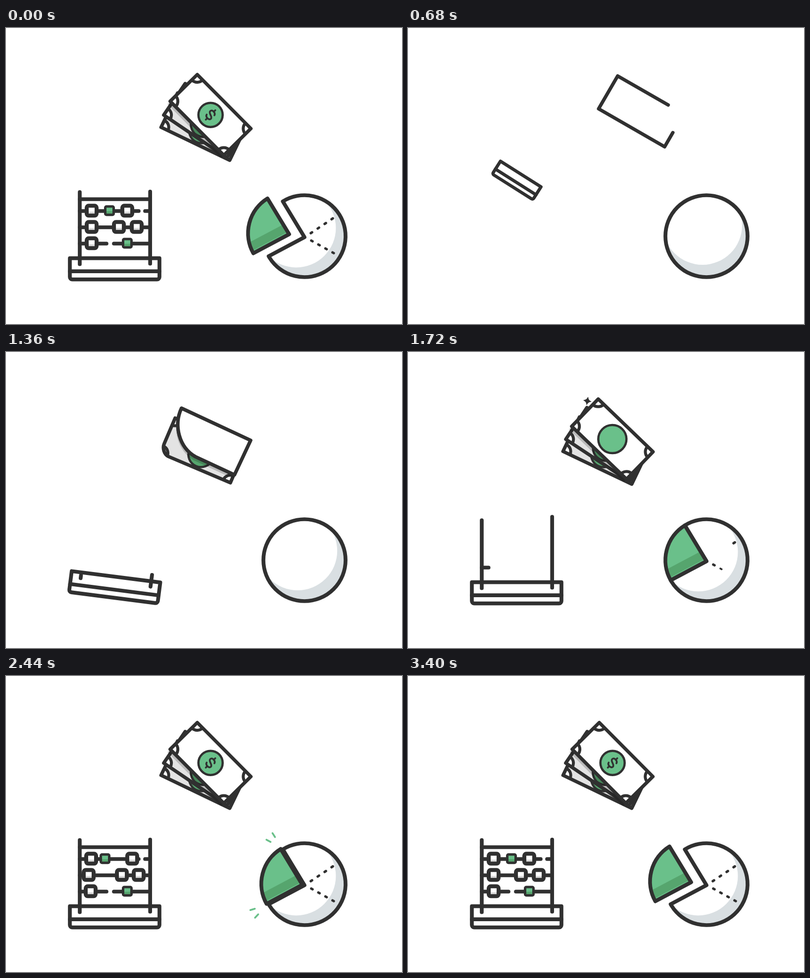
Recreate the animation shown at these times as an HTML page with a canvas. Size 800x600 px, loop 4.84 s.

```html
<!DOCTYPE html>
<html lang="en">
<head>
<meta charset="utf-8">
<title>Finance icons</title>
<style>
  html, body { margin: 0; width: 100%; height: 100%; overflow: hidden; background: #fff; }
  canvas { display: block; width: 800px; height: 600px; }
</style>
</head>
<body>
<canvas id="stage" width="800" height="600"></canvas>
<script>
const c = document.getElementById('stage').getContext('2d');
const LOOP = 4840, STEP = 40, TAU = Math.PI * 2;
const INK = '#303030', GREEN = '#6ac08a', DEEP = '#56a56e', PAPER = '#e3e3e3', SHADE = '#d9dfe2';
const THICK = 7.7;

const rad = d => d * Math.PI / 180;
const mix = (a, b, p) => a + (b - a) * p;
const span = (t, start, dur) => Math.min(1, Math.max(0, (t - start) / dur));
const easeOut = p => 1 - (1 - p) ** 3;
const easeInOut = p => p < .5 ? 2 * p * p : 1 - 2 * (1 - p) ** 2;
const overshoot = p => p && 1 - 3.3 * (1 - p) ** 3 + 2.3 * (1 - p) ** 2;

function paint(fill, width, color = INK) {
  if (fill) { c.fillStyle = fill; c.fill(); }
  if (width) { c.strokeStyle = color; c.lineWidth = width; c.stroke(); }
}
function line(x1, y1, x2, y2, w = THICK, color = INK) {
  c.beginPath();
  c.moveTo(x1, y1);
  c.lineTo(x2, y2);
  paint(null, w, color);
}
function disc(x, y, r, fill, w) {
  if (r <= 0) return;
  c.beginPath();
  c.arc(x, y, r, 0, TAU);
  paint(fill, w);
}
function group(draw) {
  c.save();
  draw();
  c.restore();
}

/* ---------- bank notes: 0 back, 1 middle, 2 front ---------- */
const BX = 77, BY = 38.5;

// Notes in the fan lie about their lower right corners.
function restPose(i) {
  const deg = 25.7 + 7.2 * i + 1.3 * i * i, a = rad(deg);
  return [
    452 - 6 * i - BX * Math.cos(a) + BY * Math.sin(a),
    268 - 5 * i - BX * Math.sin(a) - BY * Math.cos(a),
    deg
  ];
}
// Spin in the air, land as a pile, then fan out.
function place(t, i) {
  const s = Math.min(t, 1360) - 680;
  const air = [471 + s / 64, 169 + s / 320, -150 + .2317 * s + 3.78e-5 * s * s];
  const land = easeInOut(span(t, 1040, 320)), fan = easeOut(span(t, 1360, 600));
  const pile = i ? [408, 181.5, air[2]] : [397.5, 199.5, air[2] - 2];
  const rest = restPose(i);
  const [x, y, deg] = air.map((v, k) => mix(mix(v, pile[k], land), rest[k], fan));
  c.translate(x, y);
  c.rotate(rad(deg));
}
// The lower left corner curls up by the amount b.
function sheet(b) {
  c.beginPath();
  c.moveTo(BX, -BY);
  c.lineTo(BX, BY);
  c.lineTo(67 * b - BX, BY);
  c.bezierCurveTo(30 * b - BX, BY - 3 * b, -BX, BY - 38 * b, -BX, BY - 77 * b);
  c.lineTo(-BX, -BY);
  c.closePath();
}
function note(fill, bend, cornerR, coinR, coinY, coinFill) {
  sheet(bend);
  paint(fill);
  group(() => {
    c.clip();
    for (const sx of [-1, 1]) for (const sy of [-1, 1]) disc(sx * BX, sy * BY, cornerR, '#fff', 6);
  });
  disc(0, coinY, coinR, coinFill, 4.5);
  sheet(bend);
  paint(null, 7);
}
function outline(t) {
  const per = 4 * (BX + BY), len = per * easeInOut(span(t, 440, 340));
  if (!len) return;
  if (len < per) {
    c.setLineDash([len, per - len]);
    c.lineDashOffset = len * .49;
  }
  sheet(0);
  paint(null, 7);
}
function dollar(s) {
  if (!s) return;
  c.scale(s, s);
  c.beginPath();
  c.moveTo(6, -5);
  c.bezierCurveTo(5, -10, -6, -11, -6, -5);
  c.bezierCurveTo(-6, 1, 6, -1, 6, 5);
  c.bezierCurveTo(6, 11, -5, 10, -6, 5);
  paint(null, 3.6);
  for (const side of [-1, 1]) line(0, 13.5 * side, 0, 9.5 * side, 3.6);
}
function star(t) {
  const p = span(t, 1640, 700), r = 12 * Math.sin(Math.PI * p ** .7);
  if (r < .1) return;
  c.translate(366 - 12 * easeOut(p), 116 - 55 * easeOut(p));
  c.rotate(rad(10));
  c.beginPath();
  c.moveTo(0, -r);
  for (let i = 1; i <= 4; i++) {
    const a = i * TAU / 4, m = a - TAU / 8;
    c.quadraticCurveTo(Math.sin(m) * r * .28, -Math.cos(m) * r * .28, Math.sin(a) * r, -Math.cos(a) * r);
  }
  paint(INK, 1);
}
function money(t) {
  if (t < 800) {
    group(() => { place(t, 2); outline(t); });
    return;
  }
  const bend = Math.sin(Math.PI * span(t, 1140, 440));
  if (t > 1160) {
    for (const i of [0, 1]) group(() => {
      place(t, i);
      note(PAPER, bend * (i ? 1 : .27), 15.5, 25.5, 9, DEEP);
    });
    group(() => {
      place(t, 2);
      c.translate(0, 8);
      sheet(bend);
      paint('rgba(0,0,0,.18)');
    });
  }
  group(() => {
    place(t, 2);
    note('#fff', bend, 15.5 * easeOut(span(t, 1480, 180)), 24.5 * overshoot(span(t, 1520, 400)), 0, GREEN);
    dollar(easeOut(span(t, 1800, 200)));
  });
  group(() => star(t));
}

/* ---------- abacus ---------- */
// Beads are [slot, nudge]: the place on the rod and the earlier distance from it.
const ROWS = [
  { y: 371, gap: [268, 281], green: 1, beads: [[0, -1], [1, -9], [2, 10]] },
  { y: 404, gap: [291, 291], beads: [[0, -6], [1.53, 6], [2.53, 4]] },
  { y: 437, gap: [203, 218], green: 1, beads: [[0, -2], [2, 0]] }
];
function bead(x, y, green, s) {
  if (!s) return;
  c.translate(x, y);
  c.scale(s, s);
  const h = green ? 8.5 : 10;
  c.beginPath();
  c.roundRect(-h, -h, 2 * h, 2 * h, green ? 2.5 : 4);
  paint(green ? GREEN : '#fff');
  c.fillStyle = green ? DEEP : '#dadada';
  c.fillRect(-h, green ? 1 : 2, 2 * h, h - 2);
  paint(null, green ? 5 : 8);
}
function rod(t, y, start, [from, to]) {
  const p = easeOut(span(t, start, 300)), end = 149 + 142 * p;
  if (!p) return;
  line(149, y, Math.min(end, from), y);
  if (end > to) line(to, y, end, y);
}
function base(t) {
  const grow = easeOut(span(t, 584, 416));
  if (!grow) return;
  const lean = 59.5 * (grow - easeOut(span(t, 1000, 716))), a = rad(lean);
  const fall = 309 + .00096 * Math.max(0, t - 740) ** 2;
  const ground = 509.7 - 90.5 * Math.sin(a) - 21.5 * Math.cos(a);
  const sx = grow * (1 - lean / 2000), sy = Math.sqrt(grow) * (1 - lean / 1000);
  const w = 90.5 * sx, h = 21.5 * sy, ink = THICK * Math.sqrt(sy);
  c.translate(219.5, Math.min(fall, ground));
  c.rotate(a);
  c.beginPath();
  c.roundRect(-w, -h, 2 * w, 2 * h, [0, 0, 5 * sy, 5 * sy]);
  paint(null, ink);
  line(-w, 5 * sy, w, 5 * sy, ink);
  const left = 146 * easeOut(span(t, 1352, 600)), right = 146 * easeOut(span(t, 1330, 520));
  if (left) line(-70.5, -9.5, -70.5, -9.5 - left);
  if (right) line(71.7, -10.5, 71.7, -10.5 - right);
}
function abacus(t) {
  group(() => base(t));
  const offset = 1 - easeInOut(span(t, 2400, 1000));
  rod(t, 347, 1890, [291, 291]);
  ROWS.forEach(({ y, gap, green, beads }, row) => {
    rod(t, y, 1830 - 60 * row, gap);
    beads.forEach(([slot, nudge], i) => group(() =>
      bead(173 + 36 * slot + nudge * offset, y - .7, i === green,
        easeOut(span(t, 2000 + 20 * (row * 3 + i), 200)))));
  });
}

/* ---------- pie ---------- */
const PX = 603, PY = 422, R = 83, TIP_Y = 424;
const A1 = rad(150.7), A2 = rad(238.2);

function sector(from, to) {
  c.beginPath();
  c.moveTo(PX, TIP_Y);
  c.arc(PX, PY, R, from, to);
  c.closePath();
}
function wedge() {
  sector(A1, A2);
  paint(GREEN);
  group(() => {
    c.clip();
    c.translate(PX, TIP_Y);
    c.rotate(rad(-28));
    c.fillStyle = DEEP;
    c.fillRect(-100, -23, 110, 17.5);
  });
  sector(A1, A2);
  paint(null, THICK);
}
// The shade swings down and back while the disc is alone.
function crescent(t) {
  const a = rad(45 + 48.5 * Math.exp(-(((t - 942) / 321) ** 2)));
  c.globalAlpha = span(t, 320, 240);
  c.beginPath();
  c.arc(PX, PY, R, 0, TAU);
  c.clip();
  c.beginPath();
  c.rect(PX - 90, PY - 90, 180, 180);
  c.arc(PX - 23.5 * Math.cos(a), PY - 23.5 * Math.sin(a), 80, 0, TAU);
  c.fillStyle = SHADE;
  c.fill('evenodd');
}
function dots(t) {
  const dot = (x, y, slope, s) => s && line(x - 1.3, y - 1.3 * slope, x + 1.3, y + 1.3 * slope, 5 * s);
  for (let i = 0; i < 4; i++) {
    dot(617 + 14 * i, 415 - 9.4 * i, -.67, span(t, 1850 - 60 * i, 40));
    dot(618 + 14.3 * i, 431.6 + 8 * i, .56, span(t, 1630 + 60 * i, 40));
  }
}
function rays(t) {
  const p = span(t, 2320, 320);
  const inner = 12 + 36 * p, len = 9.5 * Math.sin(Math.PI * Math.min(1, p * 1.25));
  if (len < .1) return;
  for (const [corner, mid] of [[A1, 148.5], [A2, 222.5]]) for (const turn of [-15, 15]) {
    const a = rad(mid + turn), dx = Math.cos(a), dy = Math.sin(a);
    const x = PX + 87 * Math.cos(corner), y = PY + 87 * Math.sin(corner);
    line(x + dx * inner, y + dy * inner, x + dx * (inner + len), y + dy * (inner + len), 3.6, GREEN);
  }
}
function pie(t) {
  const sweep = easeInOut(span(t, 60, 440));
  if (!sweep) return;
  group(() => crescent(t));
  const grow = easeOut(span(t, 1400, 200)), out = easeOut(span(t, 2400, 840));
  if (grow < 1) {
    c.beginPath();
    c.arc(PX, PY, R, -TAU / 4, TAU * (sweep - .25));
  } else {
    sector(A2, A1 + TAU);
  }
  paint(null, THICK);
  dots(t);
  if (grow) group(() => {
    c.translate(PX - 31 * out, TIP_Y - 6 * out);
    c.scale(grow, grow);
    c.translate(-PX, -TIP_Y);
    wedge();
  });
  rays(t);
}

function draw(now) {
  const t = Math.floor((now % LOOP) / STEP) * STEP || LOOP;
  c.clearRect(0, 0, 800, 600);
  c.lineCap = c.lineJoin = 'round';
  money(t);
  abacus(t);
  pie(t);
}

const begin = performance.now();
function frame() {
  draw(performance.now() - begin);
  requestAnimationFrame(frame);
}
frame();
</script>
</body>
</html>
```
